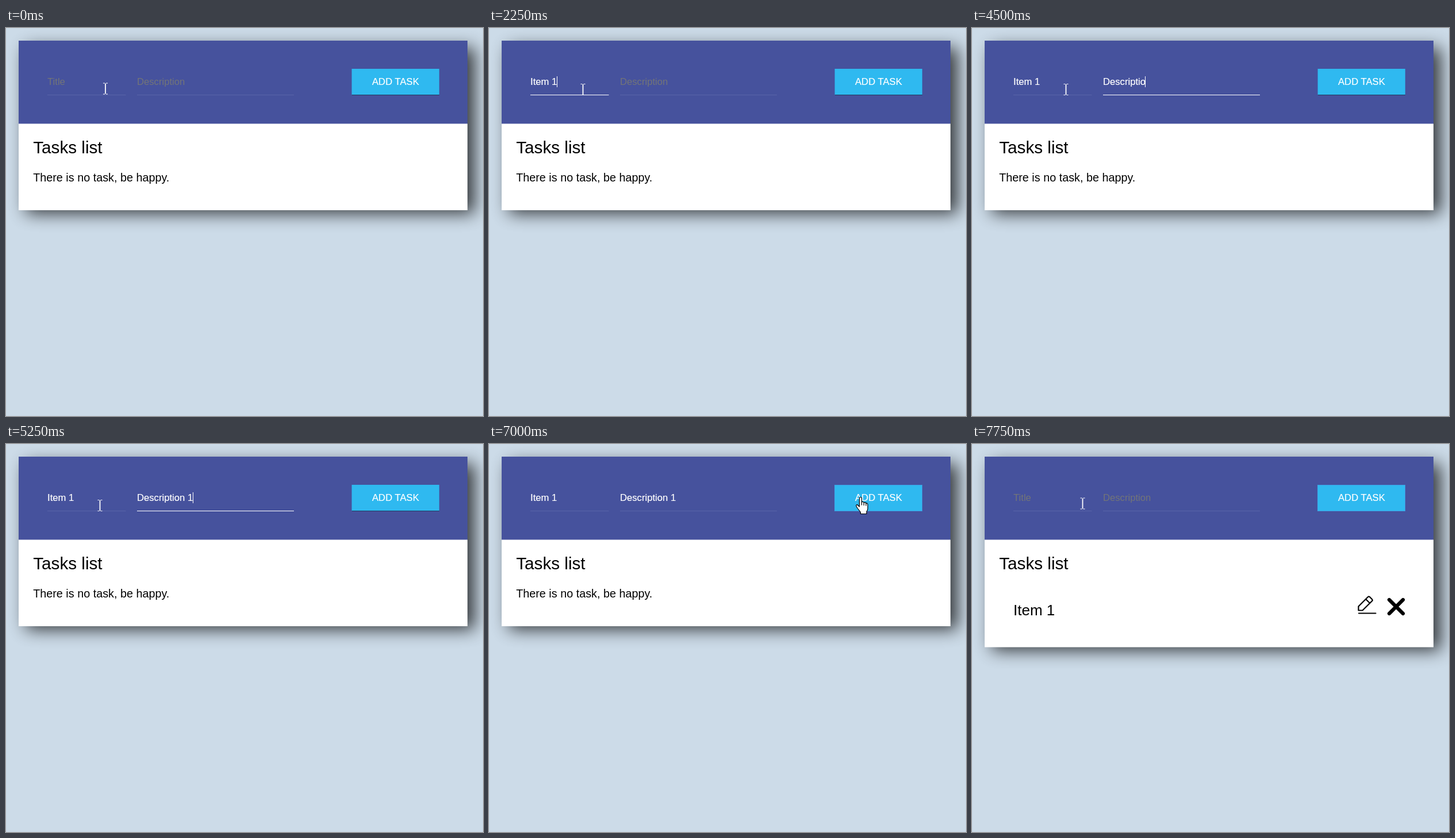
Write an HTML page that moves like this. It is 830x675 px and loops after 8 s.

```html
<!DOCTYPE html>
<html lang="en">
<head>
<meta charset="utf-8">
<title>Tasks list</title>
<style>
  html, body { margin: 0; width: 100%; height: 100%; overflow: hidden; background: #ccdbe8; }
  svg { display: block; width: 830px; height: 675px; }
  text { font-family: Arial, "Liberation Sans", sans-serif; white-space: pre; }
  .small { font-size: 16.67px; fill: #fff; }
  .bold { stroke: #fff; stroke-width: .2px; }
  #shadow { filter: blur(15px); }
</style>
</head>
<body>
<svg viewBox="0 0 830 675">
  <rect width="830" height="675" fill="#ccdbe8"/>
  <rect id="shadow" x="34.5" y="34.5" width="781" fill="#000" opacity=".75"/>
  <rect id="card" x="22" y="22" width="781" fill="#fff"/>
  <rect x="22" y="22" width="781" height="144.5" fill="#46529d"/>

  <rect id="titleLine" x="72" y="116" width="136.5" height="1"/>
  <rect id="descLine" x="228" y="116" width="273" height="1"/>
  <text id="title" class="small" x="72" y="99"></text>
  <text id="desc" class="small" x="228" y="99"></text>
  <rect id="caret" y="84" width="1" height="19" fill="#fff"/>

  <rect x="601.6" y="71" width="152.2" height="45" fill="#2fb9f0"/>
  <rect id="edge" x="602" y="116" width="152" height="1" fill="#213c60"/>
  <rect id="ring" x="601.5" y="71.5" width="152" height="45" fill="#2fb9f0" stroke="#3f9fe2"/>
  <text class="small bold" x="637" y="99">ADD TASK</text>

  <text x="47.2" y="218" font-size="29.7">Tasks list</text>
  <text id="empty" x="47.2" y="267" font-size="19.8">There is no task, be happy.</text>
  <g id="item">
    <text x="72" y="297.5" font-size="26">Item 1</text>
    <g fill="none" stroke="#000" stroke-width="2.2" stroke-linejoin="round" stroke-linecap="round">
      <path d="M672.5 289.5V282.5L689 266Q690.5 264.8 692 266L696.2 270.2Q697.4 271.7 696.2 273L679.5 289.5ZM685.3 270L692.3 277M673 294.5H702.5"/>
      <path d="M726 271L750 295M750 271L726 295" stroke-width="6.2"/>
    </g>
  </g>

  <g id="beam" fill="none" stroke="#fff">
    <path d="M-4 -9.5H-1M1 -9.5H4M-4 9.5H-1M1 9.5H4" stroke-width="1.2"/>
    <path d="M0 -9V9" stroke-width="1.8"/>
  </g>
  <path id="arrow" d="M0 0V20.3L4.6 16.3L7.5 22.8L10.7 21.4L7.9 15.1H13.5Z" fill="#fff" stroke="#000" stroke-width="1.2"/>
  <g id="hand" stroke="#000" stroke-width="1.2" stroke-linejoin="round">
    <path d="M6.5 3Q6.5 1 8.5 1T10.5 3V10Q11 8.8 12.5 9T14.3 11Q15 9.8 16.5 10.2T18 12Q19 11 20 11.8T21 14V21Q21 24 19 26V30H8.5V27L3 20L1 16.5Q.5 14 3 14.2L6.5 17.5Z" fill="#fff"/>
    <path d="M10.5 10V15M14.3 11V15.5M18 12V16" fill="none"/>
  </g>
</svg>
<script>
const LOOP = 8000;
const el = id => document.getElementById(id);
const show = (id, on) => el(id).setAttribute("visibility", on ? "visible" : "hidden");

// Each track holds [start ms, value]; a value lasts until the next start.
const titles = [[0, ""], [1250, "I"], [1750, "Item"], [2000, "Item "], [2250, "Item 1"], [7250, ""]];
const descs = [[0, ""], [3500, "D"], [3750, "De"], [4000, "Desc"], [4250, "Descri"],
  [4500, "Descriptio"], [4750, "Description"], [5000, "Description "], [5250, "Description 1"], [7250, ""]];
const focus = [[0, ""], [500, "title"], [2750, "desc"], [7000, "button"]];
const carets = [[0, false], [500, true], [1000, false], [1250, true], [3250, false],
  [3500, true], [5750, false], [6500, true], [7000, false]];
const pointers = [
  [0, ["beam", 173, 105.5]], [250, ["beam", 166, 106]], [750, ["beam", 163.5, 107]],
  [5750, ["beam", 240, 105]], [6000, ["beam", 452, 101]], [6250, ["arrow", 600.8, 91.3]],
  [6500, ["hand", 622, 91]], [6750, ["hand", 629, 91]], [7000, ["hand", 638, 91.5]],
  [7500, ["beam", 400, 99]], [7750, ["beam", 192.5, 103.5]]
];

function at(track, t) {
  let value = track[0][1];
  for (const [start, v] of track) if (t >= start) value = v;
  return value;
}

function field(id, value, hint, focused) {
  const text = el(id);
  text.textContent = value || hint;
  text.style.fill = value ? "#fff" : "#737578";
  text.classList.toggle("bold", value !== "");
  el(id + "Line").setAttribute("fill", focused ? "#fff" : "#5964a8");
  if (!focused) return;
  const end = value ? text.getComputedTextLength() : 0;
  el("caret").setAttribute("x", Math.round(+text.getAttribute("x") + end - 0.6));
}

function draw(t) {
  const active = at(focus, t);
  field("title", at(titles, t), "Title", active === "title");
  field("desc", at(descs, t), "Description", active === "desc");
  show("caret", at(carets, t));

  const pressed = active === "button";
  show("ring", pressed);
  show("edge", !pressed);

  const added = t >= 7250;
  show("empty", !added);
  show("item", added);
  const height = added ? 331.5 : 295;
  el("card").setAttribute("height", height);
  el("shadow").setAttribute("height", height - 7);

  const [kind, x, y] = at(pointers, t);
  for (const id of ["beam", "arrow", "hand"]) show(id, id === kind);
  el(kind).setAttribute("transform", `translate(${x} ${y})`);
}

const begin = performance.now();
function tick() {
  draw((performance.now() - begin) % LOOP);
  requestAnimationFrame(tick);
}
draw(0);
requestAnimationFrame(tick);
</script>
</body>
</html>
```
